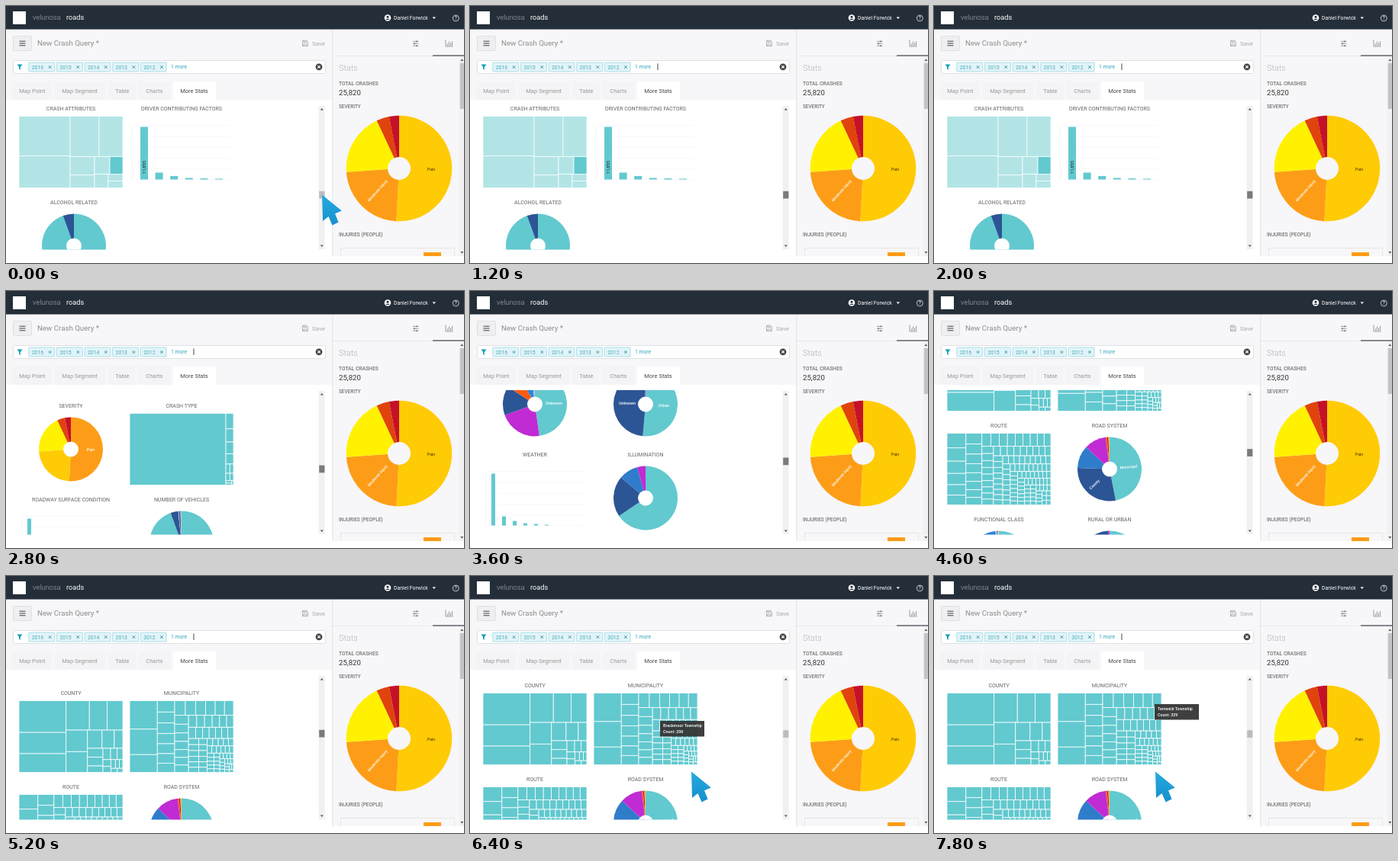
An HTML page that plays this animation: 600x337 px, repeating every 8 s.

```html
<!DOCTYPE html>
<html lang="en">
<head>
<meta charset="utf-8">
<title>Crash query stats</title>
<style>
html, body { margin: 0; width: 100%; height: 100%; overflow: hidden; background: #fff; }
svg { display: block; width: 600px; height: 337px; font-family: Roboto, sans-serif; }
</style>
</head>
<body>
<svg id="stage" viewBox="0 0 600 337" xmlns="http://www.w3.org/2000/svg"></svg>
<script>
const TEAL = '#62c9cf', PALE = '#b2e4e6', NAVY = '#2c5595', BLUE = '#2f7ccb', PINK = '#c02bd3';
const GOLD = '#ffcb05', AMBER = '#fd9d17', YELLOW = '#fff100', RUST = '#e0430c', RED = '#c51128';
const PANEL = '#f7f6f8', BOLD = 'font-weight="500"';

// Drawing helpers
const rect = (x, y, w, h, fill, more = '') =>
  `<rect x="${x}" y="${y}" width="${w}" height="${h}" fill="${fill}" ${more}/>`;
const text = (x, y, size, fill, str, more = '') =>
  `<text x="${x}" y="${y}" font-size="${size}" fill="${fill}" ${more}>${str}</text>`;
const mid = (x, y, size, fill, str, angle = 0, more = '') =>
  text(x, y, size, fill, str, `text-anchor="middle" dominant-baseline="central" transform="rotate(${angle} ${x} ${y})" ${more}`);
const path = (d, fill, stroke = 'none', width = 1) =>
  `<path d="${d}" fill="${fill}" stroke="${stroke}" stroke-width="${width}"/>`;
const disc = (x, y, r, fill, more = '') => `<circle cx="${x}" cy="${y}" r="${r}" fill="${fill}" ${more}/>`;

// Slices are [end angle, colour], clockwise from the top
function pie(cx, cy, r, hole, slices, bg = '#fff') {
  const at = deg => {
    const a = deg * Math.PI / 180;
    return `${(cx + r * Math.sin(a)).toFixed(2)} ${(cy - r * Math.cos(a)).toFixed(2)}`;
  };
  let from = 0;
  return slices.map(([to, fill]) => {
    const d = `M${cx} ${cy}L${at(from)}A${r} ${r} 0 ${+(to - from > 180)} 1 ${at(to)}Z`;
    from = to;
    return path(d, fill);
  }).join('') + disc(cx, cy, hole, bg);
}

const tile = (x, y, w, h, fill = TEAL) => rect(x, y, w, h, fill, 'stroke="#fff" stroke-opacity=".85" stroke-width=".9"');

// Squarified treemap with golden-ratio tiles; values in falling order
function treemap(x, y, w, h, values) {
  const PHI = (1 + Math.sqrt(5)) / 2;
  let left = values.reduce((a, b) => a + b), out = '', i = 0;
  while (i < values.length) {
    const alpha = Math.max(h / w, w / h) / (left * PHI), max = values[i];
    let sum = 0, best = Infinity, j = i;
    for (; j < values.length; j++) {
      const s = sum + values[j], beta = s * s * alpha;
      const ratio = Math.max(max / beta, beta / values[j]);
      if (ratio > best) break;
      best = ratio;
      sum = s;
    }
    const wide = w >= h, depth = (wide ? w : h) * sum / left;
    let pos = 0;
    for (; i < j; i++) {
      const len = (wide ? h : w) * values[i] / sum;
      out += wide ? tile(x, y + pos, depth, len) : tile(x + pos, y, len, depth);
      pos += len;
    }
    if (wide) { x += depth; w -= depth; } else { y += depth; h -= depth; }
    left -= sum;
  }
  return out;
}

const series = (n, f) => Array.from({ length: n }, (_, k) => f(k));

// Charts: each draws into a 136 x 94 box at (x, y)
const ROW = 123, W = 136, H = 94;
const map = values => (x, y) => treemap(x, y, W, H, values);
const ring = (slices, labels = []) => (x, y) =>
  pie(x + 68, y + 47, 42, 10, slices) +
  labels.map(([dx, dy, str, angle]) => mid(x + 68 + dx, y + 47 + dy, 5.2, '#fff', str, angle, BOLD)).join('');
const bars = (first, step, width, heights, label) => (x, y) =>
  series(6, k => rect(x + 3, y + 12 + k * 14.2, 130, .5, '#f0f0f0')).join('') +
  rect(x + 3, y + 12, .5, 71, '#ececec') +
  heights.map((h, k) => rect(x + first + k * step, y + 83 - h, width, h, TEAL)).join('') +
  (label ? mid(x + first + 5, y + 67, 5.6, '#222', label, -90) : '');

const attributes = (x, y) => [
  [0, 0, 67, 52], [0, 52, 67, 42], [67, 0, 38, 53], [105, 0, 31, 53], [67, 53, 32, 24], [67, 77, 32, 17],
  [99, 53, 20, 23], [99, 76, 18, 18], [117, 76, 19, 9], [117, 85, 19, 9]
].map(([a, b, w, h]) => tile(x + a, y + b, w, h, PALE)).join('') + tile(x + 119, y + 53, 17, 23);

const SHARES = [[183, GOLD], [266, AMBER], [335, YELLOW], [349, RUST], [360, RED]];
const swapped = SHARES.map(([to, c]) => [to, c === GOLD ? AMBER : c === AMBER ? GOLD : c]);

const charts = [
  ['COUNTY', map([.202, .135, .119, .093, .071, .062, .0625, .06, .036, .03, .021, .0185, .0185, ...series(11, k => .0135 * .86 ** k)])],
  ['MUNICIPALITY', map([.106, .095, .066, ...series(83, k => .0265 * .966 ** k)])],
  ['ROUTE', map(series(130, k => 1 / (k + 10)))],
  ['ROAD SYSTEM', ring([[169, TEAL], [272, NAVY], [313, BLUE], [353, PINK], [355.5, '#ff5a10'], [358, RED], [360, '#f7c948']],
    [[25, -3, 'Municipal', -5], [-20, 20, 'County', -45]])],
  ['FUNCTIONAL CLASS', ring([[172, TEAL], [250, PINK], [303, NAVY], [331, '#ff5a10'], [354, '#2c86dc'], [356, '#ddd'], [358, NAVY], [360, '#f3c9b0']],
    [[25, -2, 'Unknown', 0]])],
  ['RURAL OR URBAN', ring([[185, TEAL], [357.5, NAVY], [360, PINK]], [[-24, -2, 'Unknown', 0], [24, 1, 'Urban', 0]])],
  ['WEATHER', bars(11, 14, 5, [68, 12, 6, 3, 2, 1])],
  ['ILLUMINATION', ring([[236, TEAL], [310, NAVY], [345, BLUE], [360, PINK]])],
  ['SEVERITY', ring(swapped, [[26, 0, 'Pain', 0]])],
  ['CRASH TYPE', map([.926, .0157, .0135, .012, .0105, .005, .0045, .004, .0035, .002, .0015, .001])],
  ['ROADWAY SURFACE CONDITION', bars(11, 14, 5, [68, 14, 5, 3, 2, 1])],
  ['NUMBER OF VEHICLES', ring([[340, TEAL], [354, NAVY], [355, '#cfe6ee'], [358, '#3f4f8c'], [360, '#a9d8e2']])],
  ['CRASH ATTRIBUTES', attributes],
  ['DRIVER CONTRIBUTING FACTORS', bars(14, 19.6, 10, [69, 9, 4.5, 2, 1.4, 1], '11,855')],
  ['ALCOHOL RELATED', ring([[340, TEAL], [360, NAVY]])]
];
const chartList = charts.map(([title, draw], i) => {
  const x = i === 14 ? 21 : i % 2 ? 162 : 17, y = (i >> 1) * ROW;
  return mid(x + 68, y + .4, 7, '#636363', title) + draw(x, y + 9.5);
}).join('');

// Fixed parts
const header = rect(0, 0, 600, 30.6, '#242e39') + rect(9, 7, 17, 17, '#fff') +
  text(35, 18, 9.3, '#a4adb5', 'velunosa', 'font-weight="300"') +
  text(79, 18, 9.2, '#fff', 'roads') +
  disc(500, 15.5, 4.3, '#fff') + disc(500, 14.2, 1.5, '#242e39') + path('M497.2 18a3 2 0 0 1 5.6 0z', '#242e39') +
  text(508, 18, 6.9, '#fff', 'Daniel Forwick') + path('M558.5 14.5h4.6l-2.3 2.4z', '#fff') +
  disc(589.3, 16, 4, 'none', 'stroke="#cfd3d7" stroke-width=".9"') + mid(589.3, 16.2, 6.5, '#dfe2e5', '?', 0, BOLD);

const titleBar = rect(9.5, 39.5, 24, 19, '#efeef0', 'stroke="#e0dfe1" rx="1"') +
  path('M17.5 46.2h8M17.5 49h8M17.5 51.8h8', 'none', '#444', 1) +
  text(41, 52, 9.7, '#8c8c8c', 'New Crash Query *') +
  path('M388.5 45.3h5l1.8 1.8v5.5h-6.8zM390 45.3v2.2h3.5v-2.2M390 52.6v-2.6h3.8v2.6', 'none', '#a9a9a9', .9) +
  text(401, 52, 7.9, '#a9a9a9', 'Save');

const chips = [2016, 2015, 2014, 2013, 2012].map((year, i) => {
  const x = 29.8 + i * 36.6;
  return rect(x, 74, 34, 12, '#e2f4f8', 'stroke="#9bd8e4" stroke-width=".8" rx="1"') +
    text(x + 4, 82.5, 6.8, '#45a9ba', year) +
    path(`M${x + 26} 78.3l3.6 3.6m0-3.6l-3.6 3.6`, 'none', '#2b8b9c', .9);
}).join('');

const filter = rect(9.5, 71.5, 409, 17, '#fff', 'stroke="#e0dfe1" rx="1"') +
  path('M14.5 76.5h7l-2.6 3.4v4l-1.8-1.3v-2.7z', '#159fc4') + chips +
  text(216, 82.3, 6.8, '#2fa3bd', '1 more') +
  disc(410, 79.8, 4.4, '#444') + path('M408.3 78.1l3.4 3.4m0-3.4l-3.4 3.4', 'none', '#fff', 1.1);

const tabs = [['Map Point', 8, 52], ['Map Segment', 64, 66], ['Table', 134, 36], ['Charts', 174, 41], ['More Stats', 219, 56]]
  .map(([name, x, w], i) => rect(x, 99, w, 24, i === 4 ? '#fff' : '#f4f3f5') +
    text(x + 9.3, 113.5, 7.5, i === 4 ? '#444' : '#979797', name)).join('');

const arrow = (x, y, dir, c = '#555') => path(`M${x - 2} ${y + dir}h4l-2 ${-2.4 * dir}z`, c);

const sidebar = rect(427.5, 31, 172.5, 297, PANEL) + rect(427.5, 31, .8, 297, '#dedede') +
  rect(428, 65, 172, .7, '#e2e2e2') + rect(559, 64.4, 41, 1.3, '#4a525c') +
  path('M533 46.4h7.5M533 49.3h7.5M533 52.2h7.5', 'none', '#888', .8) +
  rect(537.5, 45.4, 1.2, 2, '#666') + rect(534.6, 48.3, 1.2, 2, '#666') + rect(537.5, 51.2, 1.2, 2, '#666') +
  path('M576 44.5v8.5h9.5M578.5 52v-2.5M580.5 52v-5.5M582.5 52v-3.5M584.5 52v-6', 'none', '#858585', .8) +
  text(436, 85, 10.9, '#b4b4b4', 'Stats', 'font-weight="300"') +
  text(436, 103.8, 6.75, '#757575', 'TOTAL CRASHES', BOLD) +
  text(436, 116.7, 9.6, '#333', '25,820') +
  text(436, 133.9, 6.4, '#757575', 'SEVERITY', BOLD) +
  pie(515, 213, 69.3, 15, SHARES, PANEL) +
  mid(557, 214, 5.2, '#6b4a00', 'Pain', 0, BOLD) + mid(486.5, 242, 5.1, '#fff', 'Moderate Injury', -48, BOLD) +
  text(436, 301.8, 6.5, '#757575', 'INJURIES (PEOPLE)', BOLD) +
  path('M438.5 328v-10.5h149v10.5', 'none', '#e2e2e2', .8) + rect(547, 323, 23, 5, AMBER) +
  rect(594, 67, 6, 261, '#f1f1f1') + rect(594.7, 75, 5.3, 60, '#c4c4c4') +
  arrow(597.3, 71, 1) + arrow(597.3, 323, -1);

document.getElementById('stage').innerHTML =
  '<defs><clipPath id="view"><rect x="8" y="130" width="400" height="189.5"/></clipPath>' +
  '<linearGradient id="ink" x2="0" y2="1"><stop stop-color="#27a9e0"/><stop offset="1" stop-color="#1590cb"/></linearGradient></defs>' +
  rect(0, 0, 600, 337, '#fff') + rect(0, 30, 428, 93, PANEL) +
  header + titleBar + filter + tabs + sidebar +
  `<g clip-path="url(#view)"><g id="list">${chartList}</g></g>` +
  rect(409.6, 131, 8, 188, '#f1f0f1') + arrow(413.8, 135.5, 1) + arrow(413.8, 314.5, -1) +
  rect(410.2, 0, 7.2, 9.7, '#777', 'id="thumb"') +
  rect(245.5, 75.5, .9, 8.5, '#333', 'id="caret"') +
  '<g id="tip">' + rect(0, 0, 58, 20.5, '#333', 'fill-opacity=".94"') +
  text(4, 8.2, 5.4, '#fff', '', `id="place" ${BOLD}`) + text(4, 16, 5.4, '#fff', '', `id="count" ${BOLD}`) + '</g>' +
  '<g id="pointer">' + path('M0 -.5L25.8 20.5 17 24.3 21.5 35.5 13.5 39.5 8.5 28 1 34Z', 'url(#ink)') + '</g>';

// Motion
const LOOP = 8000, STEP = 200;
const SCROLL = [[2000, -603], [2800, -341], [4200, -13], [5200, 154], [5400, 144]];
const MOVE_X = [[5600, 414], [6400, 290]], MOVE_Y = [[5600, 207], [6400, 257]];
const el = id => document.getElementById(id);
const show = (id, on) => el(id).setAttribute('visibility', on ? 'visible' : 'hidden');
const place = (id, x, y) => el(id).setAttribute('transform', `translate(${x} ${y})`);

function track(keys, t) {
  if (t <= keys[0][0]) return keys[0][1];
  for (let i = 1; i < keys.length; i++) {
    const [t0, a] = keys[i - 1], [t1, b] = keys[i];
    if (t <= t1) return a + (b - a) * (t - t0) / (t1 - t0);
  }
  return keys[keys.length - 1][1];
}

function draw(t) {
  const y = Math.round(track(SCROLL, t)), dragging = t >= 1200 && t < 5600;
  place('list', 0, y);
  el('thumb').setAttribute('y', (201.8 + (154 - y) * .0542).toFixed(1));
  el('thumb').setAttribute('fill', dragging ? '#7b7b7b' : '#bdbdbd');
  show('caret', t >= 1200 && (t + 250) % 1000 < 500);

  show('pointer', !dragging);
  if (t < 1200) place('pointer', 414, 248);
  else place('pointer', track(MOVE_X, t), track(MOVE_Y, t));

  const later = t >= 7000;
  show('tip', t >= 6200);
  place('tip', later ? 289 : 249, later ? 168 : 190);
  el('place').textContent = later ? 'Tarnwick Township' : 'Brackmoor Township';
  el('count').textContent = later ? 'Count: 329' : 'Count: 206';
}

const start = performance.now();
function tick() {
  const t = (performance.now() - start) % LOOP;
  draw(Math.floor(t / STEP) * STEP);
  requestAnimationFrame(tick);
}
tick();
</script>
</body>
</html>
```
